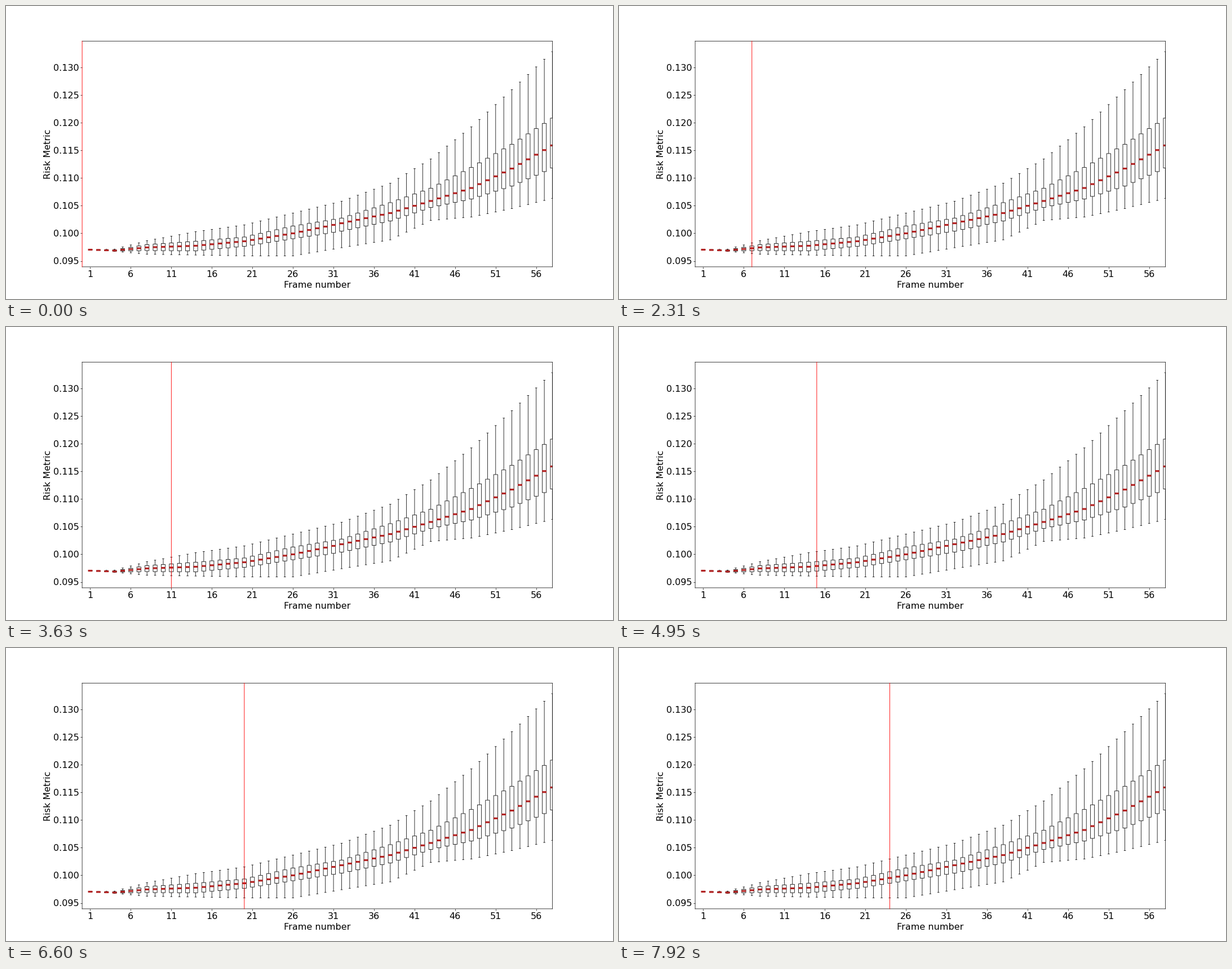
A matplotlib script for the animation above (8000 ms loop, 1077 by 520 pixels).

```python
import numpy as np
import matplotlib.pyplot as plt
from matplotlib.animation import FuncAnimation
from matplotlib.collections import LineCollection

W, H, DPI = 1077, 520, 64
PX = 72 / DPI                 # points per pixel
LOOP, TICK, STEP = 8000, 20, 330
LEFT, RIGHT, TOP, BOTTOM = 135.1, 969.5, 62.3, 462.9
COUNT = 58
KEYS = (1, 4, 8, 14, 20, 26, 32, 38, 43, 48, 53, 58)


def metric(row):
    """Risk metric at a pixel row of the stage."""
    return 0.095 + (452.0 - np.asarray(row)) * 0.005 / 49.14


def curve(*rows):
    """Metric for every box, from the pixel rows at the key boxes."""
    return metric(np.interp(x, KEYS, rows))


x = np.arange(1, COUNT + 1)
high = curve(432, 431, 416, 400, 388, 367, 346, 314, 271, 214, 148, 80.5)
upper = curve(432, 432.5, 423, 417, 409.5, 390, 376, 348.5, 323, 286, 245, 198.5)
median = curve(432, 433.5, 428, 425, 417, 403, 385, 367, 345.5, 322.5, 288, 247)
lower = curve(432, 434.5, 433.5, 434, 426, 412.5, 399, 381, 357, 342, 319, 287)
low = curve(432, 435, 440, 441.5, 443, 443, 428.5, 414.5, 380, 374, 359, 341)

plt.rcParams["font.family"] = "DejaVu Sans"
fig = plt.figure(figsize=(W / DPI, H / DPI), dpi=DPI, facecolor="white")
ax = fig.add_axes([LEFT / W, 1 - BOTTOM / H,
                   (RIGHT - LEFT) / W, (BOTTOM - TOP) / H])

thin = dict(colors="black", linewidths=0.8 * PX, zorder=2, snap=False)
for start, end in ((upper, high), (lower, low)):
    ax.vlines(x, start, end, **thin)
    ax.hlines(end, x - 0.125, x + 0.125, **thin)
boxes = [[(k - 0.25, a), (k + 0.25, a), (k + 0.25, b), (k - 0.25, b),
          (k - 0.25, a)] for k, a, b in zip(x, lower, upper)]
ax.add_collection(LineCollection(boxes, **thin))
ax.hlines(median, x - 0.27, x + 0.27, colors="firebrick",
          linewidths=3.2 * PX, zorder=2.1, snap=False)

ax.set_xlim(0, COUNT)
ax.set_ylim(metric(BOTTOM - 0.5), metric(TOP - 0.5))
ax.set_xticks(range(1, COUNT, 5))
ax.set_yticks(np.arange(0.095, 0.1301, 0.005))
ax.yaxis.set_major_formatter("{x:.3f}")
ax.tick_params(labelsize=16 * PX, length=2.8 * PX, width=0.7 * PX,
               pad=2.4 * PX)
ax.tick_params(axis="x", pad=3.6 * PX)
ax.set_xlabel("Frame number", fontsize=16 * PX, labelpad=3.6 * PX)
ax.set_ylabel("Risk Metric", fontsize=16 * PX, labelpad=2.4 * PX)
for spine in ax.spines.values():
    spine.set(linewidth=0.75 * PX, snap=False)

cursor = ax.axvline(0, color="red", lw=0.9 * PX, zorder=2.6,
                    clip_on=False, snap=False)


def update(i):
    step = int((i + 0.5) * TICK) // STEP
    cursor.set_xdata([step, step])
    # at the start the cursor stands in for the left edge
    ax.spines["left"].set_visible(step > 0)
    return (cursor,)


anim = FuncAnimation(fig, update, frames=LOOP // TICK, interval=TICK,
                     repeat=True, repeat_delay=0, blit=False)
plt.show()
```
